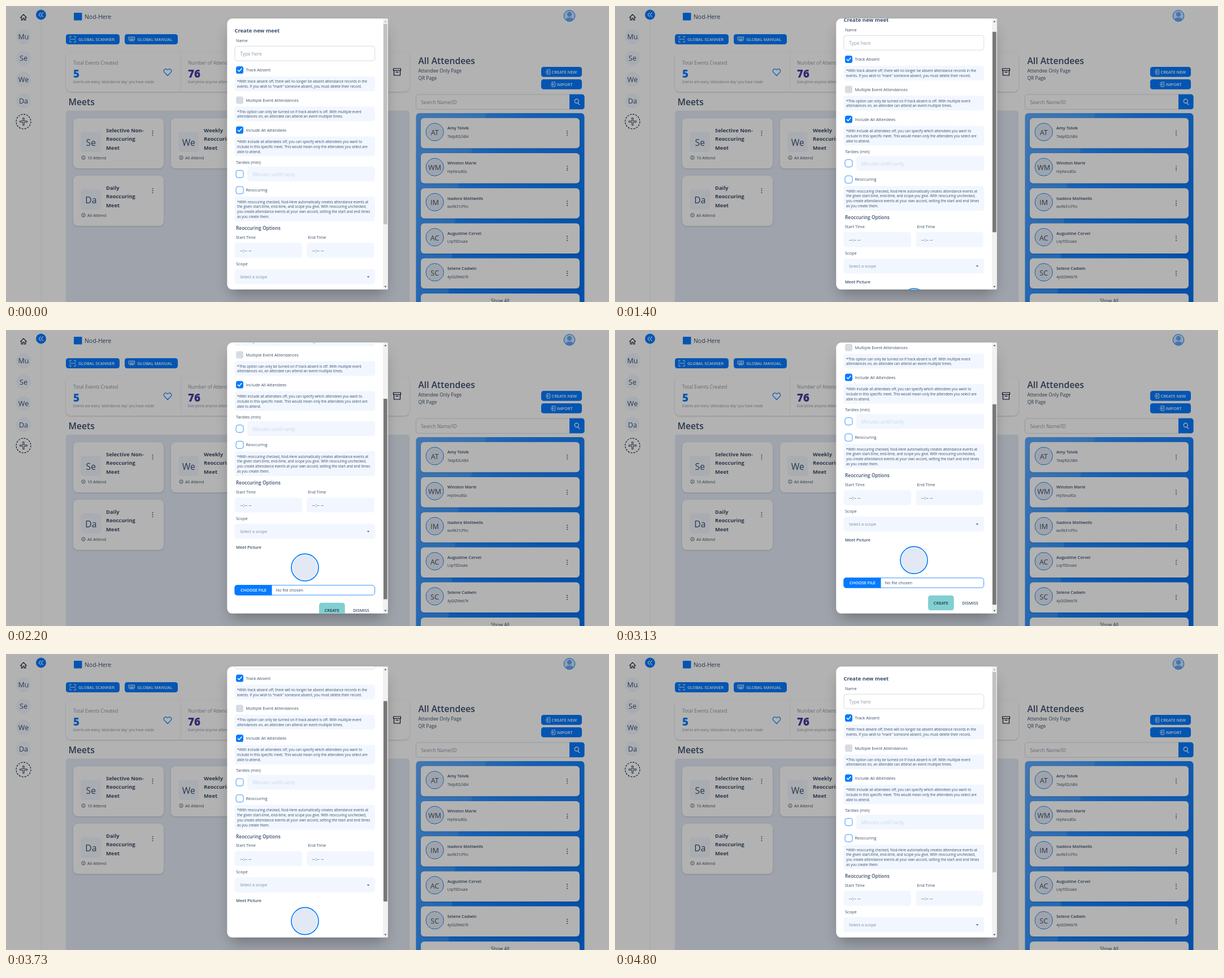
Animation, 1067 px wide and 525 px high, one loop 6390 ms. Source, as an HTML page with a canvas:

```html
<!DOCTYPE html>
<html lang="en">
<head>
<meta charset="utf-8">
<title>Create new meet</title>
<style>
  html, body { margin: 0; width: 100%; height: 100%; overflow: hidden; background: #b2b2b2; }
  canvas { position: absolute; left: 0; top: 0; }
</style>
</head>
<body>
<canvas id="page" width="1067" height="525"></canvas>
<canvas id="modal" width="1067" height="525"></canvas>
<script>
const PRIMARY = '#047aff', SECONDARY = '#463aa1', SUCCESS = '#81cfd1';
const SOFT = '#f2f7ff', MUTED = '#e3e9f4', INK = '#394e6a', DARK = '#021431';
const BRAND = 'Nod-Here';
const LOOP = 6390, STEP = 1000 / 15;

const page = document.getElementById('page').getContext('2d');
const modal = document.getElementById('modal').getContext('2d');
let ctx = page;

function box(x, y, w, h, r, fill, stroke, lineWidth = 0.8) {
  ctx.beginPath();
  ctx.roundRect(x, y, w, h, r);
  if (fill) { ctx.fillStyle = fill; ctx.fill(); }
  if (stroke) { ctx.strokeStyle = stroke; ctx.lineWidth = lineWidth; ctx.stroke(); }
}

function shadowBox(x, y, w, h, r, fill, dy, blur, alpha) {
  ctx.save();
  ctx.shadowColor = `rgba(0,0,0,${alpha})`;
  ctx.shadowOffsetY = dy;
  ctx.shadowBlur = blur;
  box(x, y, w, h, r, fill);
  ctx.restore();
}

function disc(x, y, r, fill, stroke, lineWidth = 1) {
  box(x - r, y - r, 2 * r, 2 * r, r, fill, stroke, lineWidth);
}

// y is the middle of the capitals
function text(str, x, y, size, { weight = 400, color = INK, alpha = 1, align = 'left' } = {}) {
  ctx.save();
  ctx.font = `${weight} ${size * 0.94}px "Open Sans", "Noto Sans", sans-serif`;
  ctx.textAlign = align;
  ctx.globalAlpha = alpha;
  ctx.fillStyle = color;
  ctx.fillText(str, x, y + size * 0.34);
  ctx.restore();
}

function icon(d, x, y, color, lineWidth = 1, fill) {
  ctx.save();
  ctx.translate(x, y);
  ctx.lineWidth = lineWidth;
  ctx.lineCap = ctx.lineJoin = 'round';
  const path = new Path2D(d);
  if (fill) { ctx.fillStyle = fill; ctx.fill(path); }
  if (color) { ctx.strokeStyle = color; ctx.stroke(path); }
  ctx.restore();
}

function dots(x, y) {
  for (const dy of [-3.6, 0, 3.6]) disc(x, y + dy, 0.95, INK);
}

function button(label, x, y, w, h, textX) {
  box(x, y, w, h, 4.4, PRIMARY);
  text(label, textX, y + h / 2, 7.8, { weight: 600, color: '#fff' });
}

function sidebar() {
  box(62, 0, 0.8, 525, 0, MUTED);
  icon('M-5.2 .3L0-5 5.2 .3M-3.8-1V5H-1.3V1.5H1.3V5H3.8V-1', 31, 20, DARK, 1.1);
  disc(62, 15.5, 9, PRIMARY);
  icon('M-.7-3.6L-4 0L-.7 3.6M3.5-3.6L.2 0L3.5 3.6', 62, 15.5, '#fff', 1.1);
  ['Mu', 'Se', 'We', 'Da'].forEach((name, i) => {
    const y = 54.4 + i * 37.8;
    disc(31, y, 13.3, SOFT);
    text(name, 31, y + 0.5, 13.3, { align: 'center' });
  });
  ctx.setLineDash([3.2, 1.9]);
  disc(31, 205, 13, null, DARK, 1.1);
  ctx.setLineDash([]);
  icon('M-1.1-6.5H1.1V-1.1H6.5V1.1H1.1V6.5H-1.1V1.1H-6.5V-1.1H-1.1Z', 31, 205, DARK, 0.8);
}

function header() {
  box(120, 12, 14.5, 13.5, 1, PRIMARY);
  text(BRAND, 139, 19, 11.1, { weight: 500 });
  disc(997, 17.5, 9.8, '#cfe4ff', PRIMARY, 1);
  ctx.save();
  ctx.beginPath();
  ctx.arc(997, 17.5, 9.3, 0, 7);
  ctx.clip();
  disc(997, 14.8, 4.2, '#62a9f5');
  box(989.5, 20.5, 15, 12, 6, '#62a9f5');
  ctx.restore();

  button('GLOBAL SCANNER', 106, 50, 95, 18, 128);
  icon('M-5-2.5V-5H-2.5M2.5-5H5V-2.5M5 2.5V5H2.5M-2.5 5H-5V2.5M-5 0H5', 118, 59, '#fff', 0.9);
  button('GLOBAL MANUAL', 210, 50, 94, 18, 232.5);
  icon('M-5-4H5V1.5H-5ZM-3-2H-2M-.5-2H.5M2-2H3M-3 0H3M-3 4L0 2 3 4', 222.5, 59, '#fff', 0.9);
}

function stat(x, title, value, note, color) {
  text(title, x, 101.3, 8.9, { alpha: 0.6 });
  text(value, x, 120.5, 20, { weight: 800, color });
  text(note, x, 134.7, 6.67, { alpha: 0.6 });
}

function stats() {
  shadowBox(106, 82, 608, 70, 8.9, '#fff', 1, 3, 0.2);
  box(309, 82, 0.7, 70, 0, '#e5e7eb');
  stat(119, 'Total Events Created', '5', "Events are every 'attendance day' you have made", PRIMARY);
  stat(322, 'Number of Attendances', '76', 'Everytime anyone attends an event', SECONDARY);
  icon('M0 6L-5.8 .2C-9-3.5-3.5-8.5 0-4C3.5-8.5 9-3.5 5.8 .2Z', 286, 117.5, PRIMARY, 1.2);
  icon('M-6.5-6H6.5V-2.5H-6.5ZM-5.5-2.5V6H5.5V-2.5M-2 .3H2', 692, 117, DARK, 1.2);
}

function meetCard(x, y, short, lines, count) {
  shadowBox(x, y, 160, 89, 8, '#fff', 1, 3, 0.16);
  box(x + 13.3, y + 24, 36, 36, 5, SOFT);
  text(short, x + 31.3, y + 43, 16.7, { align: 'center' });
  lines.forEach((line, i) => text(line, x + 58, y + 21.4 + i * 15.6, 10, { weight: 700 }));
  dots(x + 140.5, y + 26.5);
  disc(x + 18, y + 70, 3.2, null, INK, 0.8);
  icon('M0-.3V1.5M0-1.6V-1.5', x + 18, y + 70, INK, 0.8);
  text(count, x + 25, y + 70, 7.8);
}

function meets() {
  text('Meets', 110.5, 170, 16.7, { weight: 600 });
  box(106, 185.5, 608, 360, 5, MUTED);
  meetCard(119, 199, 'Se', ['Selective Non-', 'Reoccuring', 'Meet'], '10 Attend');
  meetCard(292, 199, 'We', ['Weekly', 'Reoccuring', 'Meet'], 'All Attend');
  meetCard(119, 301, 'Da', ['Daily', 'Reoccuring', 'Meet'], 'All Attend');
}

function attendeeCard(y, name, id) {
  shadowBox(734, y, 281, 53.5, 6, '#fff', 1, 3, 0.15);
  disc(758.7, y + 24.7, 15.6, '#fff', PRIMARY, 1);
  disc(758.7, y + 24.7, 14.2, MUTED);
  const initials = name.split(' ').map(part => part[0]).join('');
  text(initials, 758.7, y + 25.6, 13.3, { align: 'center' });
  text(name, 781, y + 17.8, 7.8, { weight: 600 });
  text(id, 781, y + 32.8, 6.67);
  dots(993, y + 26.7);
}

function attendees() {
  text('All Attendees', 729.5, 97, 16.7, { weight: 600 });
  text('Attendee Only Page', 729.5, 115, 8.9);
  text('QR Page', 729.5, 128.3, 8.9);
  const enter = 'M-2-1.5V-4H3.5V4H-2V1.5M-4 0H1M-.7-1.8L1 0L-.7 1.8';
  button('CREATE NEW', 947, 108, 72, 17.8, 965.5);
  icon(enter, 959, 117, '#fff', 0.9);
  button('IMPORT', 947, 130, 72, 17.8, 974.5);
  icon(enter, 968, 139, '#fff', 0.9);

  box(725.5, 157, 272, 26.3, [4.4, 0, 0, 4.4], '#fff', 'rgba(57,78,106,.25)');
  text('Search Name/ID', 734.5, 170.7, 8.9, { alpha: 0.6 });
  box(997, 156.6, 26.6, 26.7, [0, 4.4, 4.4, 0], PRIMARY);
  icon('M3.6-1.2A3.6 3.6 0 1 1-3.6-1.2A3.6 3.6 0 1 1 3.6-1.2M1.7 1.9L5 5', 1009.8, 170, '#fff', 1.2);

  const shade = ctx.createLinearGradient(725, 190, 1023, 420);
  shade.addColorStop(0, '#55a5ff');
  shade.addColorStop(0.45, '#1e88ff');
  shade.addColorStop(1, '#0473f2');
  ctx.save();
  box(725.5, 190, 298, 345, 6, shade);
  ctx.clip();
  icon('M0 0H125L75 125L55 345H0Z', 725.5, 190, null, 0, 'rgba(120,185,255,.3)');
  ctx.restore();
  [
    ['Amy Tolvik', '7kdpR2LNB4'],
    ['Winston Marle', 'HqVbnu8Gs'],
    ['Isadora Mottwells', 'wuRk31cPXo'],
    ['Augustine Corvel', 'LnpTEDvuke'],
    ['Selene Cadwin', '4yGtZWeb7K'],
  ].forEach(([name, id], i) => attendeeCard(198.8 + i * 62.2, name, id));
  box(734, 510, 281, 40, 6, '#fff');
  text('Show All', 874.5, 523.4, 8.9, { align: 'center' });
}

function drawPage() {
  ctx = page;
  box(0, 0, 1067, 525, 0, '#fff');
  sidebar();
  header();
  stats();
  meets();
  attendees();
  box(0, 0, 1067, 525, 0, 'rgba(0,0,0,.3)');
  shadowBox(397.5, 28.5, 272, 468, 8.9, '#fff', 14, 27, 0.3);
}

function checkbox(y, state, label = '') {
  const fill = { on: PRIMARY, disabled: '#d7dce1', off: '#fff' }[state];
  box(407, y - 6.5, 13, 13, 3.6, fill, state === 'off' ? PRIMARY : null);
  if (state === 'on') icon('M-3.2 .2L-1 2.5L3.4-2.4', 413.5, y, '#fff', 1.5);
  text(label, 424.5, y, 7.8);
}

function note(y, h, ...lines) {
  box(404.5, y, 248.5, h, 4.4, SOFT);
  lines.forEach((line, i) => text(line, 409, y + 9.3 + i * 8.9, 6.67));
}

function form() {
  text('Create new meet', 404.5, 44, 10, { weight: 700 });
  text('Name', 407, 61.3, 7.8);
  box(404.9, 71.3, 247.8, 26, 4.4, '#fff', 'rgba(57,78,106,.25)');
  text('Type here', 414, 85, 8.9, { alpha: 0.55 });

  checkbox(113.5, 'on', 'Track Absent');
  note(124.8, 26.4, '*With track absent off, there will no longer be absent attendance records in the',
    'events. If you wish to "mark" someone absent, you must delete their record.');
  checkbox(167, 'disabled', 'Multiple Event Attendances');
  note(178, 26.5, '*This option can only be turned on if track absent is off. With multiple event',
    'attendances on, an attendee can attend an event multiple times.');
  checkbox(220, 'on', 'Include All Attendees');
  note(231.4, 35.2, '*With include all attendees off, you can specify which attendees you want to',
    'include in this specific meet. This would mean only the attendees you select are',
    'able to attend.');

  text('Tardies (min)', 407, 277, 7.8);
  checkbox(298, 'off');
  box(427, 284.7, 226, 26.6, 4.4, SOFT);
  text('Minutes untill tardy', 436, 298.5, 8.9, { alpha: 0.2 });
  checkbox(326.7, 'off', 'Reoccuring');
  note(338, 44, `*With reoccuring checked, ${BRAND} automatically creates attendance events at`,
    'the given start-time, end-time, and scope you give. With reoccuring unchecked,',
    'you create attendance events at your own accord, setting the start and end times',
    'as you create them.');

  text('Reoccuring Options', 407, 394, 8.9, { weight: 600 });
  [['Start Time', 404.5], ['End Time', 532.3]].forEach(([label, x]) => {
    text(label, x + 2.3, 410.3, 7.8);
    box(x, 420, 119.5, 26.7, 4.4, SOFT);
    text('--:-- --', x + 9.5, 434, 8.9);
  });
  text('Scope', 407, 457, 7.8);
  box(404.5, 466.7, 248.5, 26.7, 4.4, SOFT);
  text('Select a scope', 414, 480.3, 7.8, { alpha: 0.65 });
  icon('M-2.3-1.1H2.3L0 1.3Z', 641, 480.5, null, 0, INK);

  text('Meet Picture', 407, 508, 7.8, { weight: 600 });
  disc(529, 544.2, 24, '#fff', PRIMARY, 1.7);
  disc(529, 544.2, 22.3, MUTED);
  box(404.9, 575.7, 247.7, 17.4, 4.4, '#fff', PRIMARY);
  box(404.5, 575.3, 66, 18.2, [4.4, 0, 0, 4.4], PRIMARY);
  text('CHOOSE FILE', 438, 584.5, 7.8, { weight: 600, color: '#fff', align: 'center' });
  text('No file chosen', 477.5, 584.5, 7.8);
  box(554, 606.7, 45.7, 26.5, 4.4, SUCCESS);
  text('CREATE', 576.8, 620, 7.8, { weight: 600, color: '#20343a', align: 'center' });
  text('DISMISS', 628.5, 620, 7.8, { weight: 600, align: 'center' });
}

const MAX_SCROLL = 143;
// [step, scroll offset]: drag down, hold, drag back up
const DRAG = [[18, 0], [21, 19], [27, 63], [35, MAX_SCROLL], [46, MAX_SCROLL],
  [47, 136], [56, 70.5], [61, 36.7], [68, 0]];

function scrollAt(step) {
  const next = DRAG.findIndex(([s]) => s >= step);
  if (next <= 0) return 0;
  const [s0, y0] = DRAG[next - 1], [s1, y1] = DRAG[next];
  return y0 + (y1 - y0) * (step - s0) / (s1 - s0);
}

function scrollbar(scroll, held) {
  const arrowColor = atEnd => atEnd ? '#a3a3a3' : '#505050';
  box(667, 22.3, 8.7, 480.5, 0, '#f1f1f1');
  box(668, 31.7 + scroll * 0.735, 6.7, 355.5, 0, held ? '#787878' : '#c1c1c1');
  icon('M-2.1 1.2H2.1L0-1.2Z', 671.4, 27.3, null, 0, arrowColor(scroll <= 0));
  icon('M-2.1-1.2H2.1L0 1.2Z', 671.4, 498, null, 0, arrowColor(scroll >= MAX_SCROLL));
}

function drawModal(time) {
  const step = Math.floor((time + 3.5) / STEP);
  const scroll = scrollAt(step);
  ctx = modal;
  ctx.clearRect(0, 0, 1067, 525);
  ctx.save();
  box(391.3, 22.3, 284.4, 480.5, 8.9, '#fff');
  ctx.clip();
  ctx.translate(0, -scroll);
  form();
  ctx.restore();
  scrollbar(scroll, step >= 16 && step < 72);
}

function frame() {
  drawModal(performance.now() % LOOP);
  requestAnimationFrame(frame);
}

drawPage();
frame();
</script>
</body>
</html>
```
